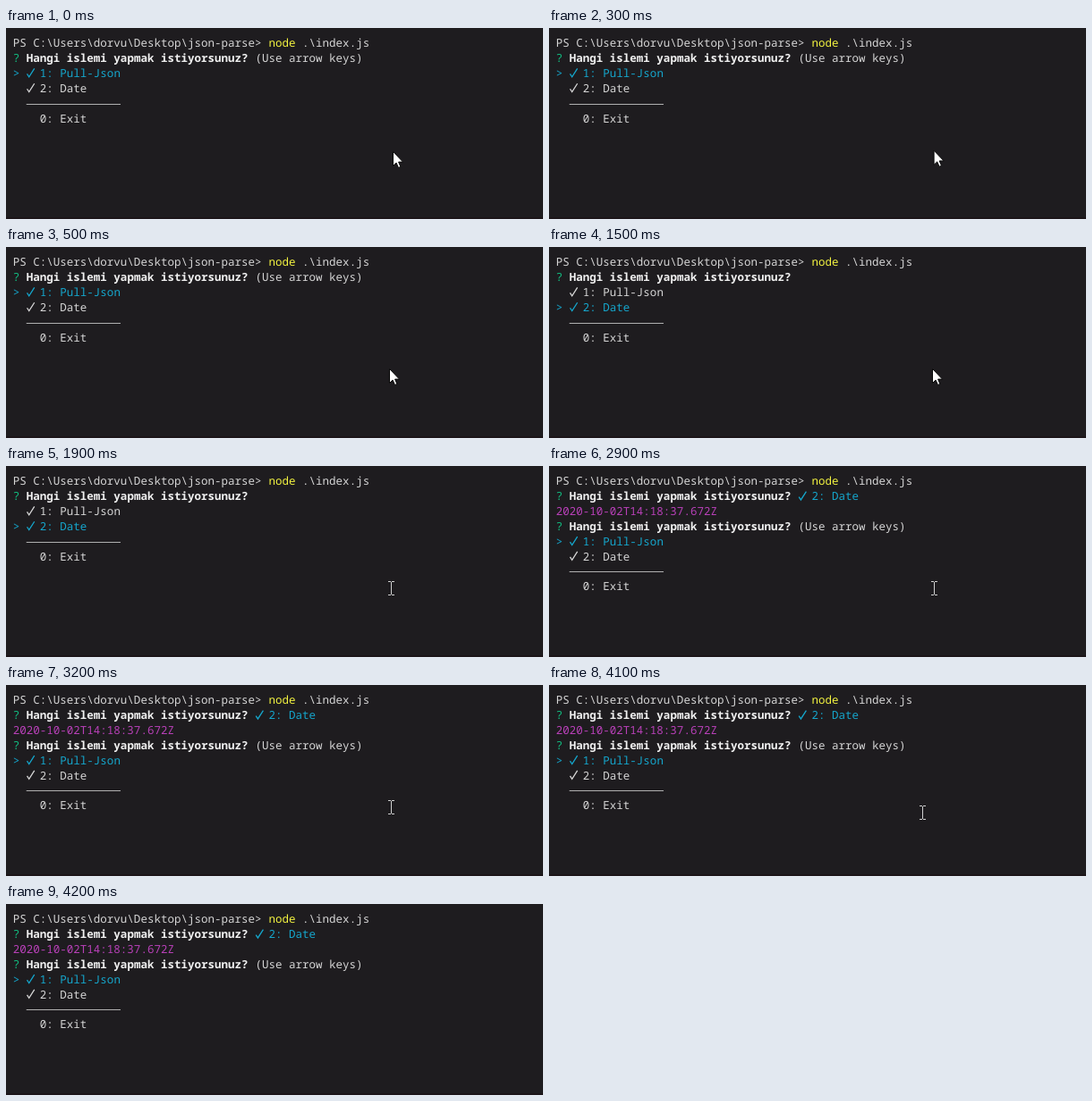
An HTML page with a canvas for the animation above (4.7 s loop, 600 px wide and 214 px high).

```html
<!DOCTYPE html>
<html lang="tr">
<head>
<meta charset="utf-8">
<title>Terminal menu</title>
<style>
  html, body { margin: 0; width: 100%; height: 100%; overflow: hidden; background: #1e1c1f; }
  canvas { display: block; }
</style>
</head>
<body>
<canvas id="stage" width="600" height="214"></canvas>
<script>
const ctx = document.getElementById('stage').getContext('2d');
const LOOP = 4700;
const LEFT = 7.7, CELL = 7.52, BASELINE = 21.3, ROW = 16.85;
const FONT = '12.53px "Noto Sans Mono", "DejaVu Sans Mono", monospace';
const COLOR = {
  back: '#1e1c1f', edge: '#1b1418', text: '#d6d6d6', bold: '#f0f0f0',
  yellow: '#f4f440', green: '#12bd80', cyan: '#15a6cc', magenta: '#b840b8'
};
const QUESTION = 'Hangi islemi yapmak istiyorsunuz?';
const ANSWER_COL = QUESTION.length + 3;

const colX = col => LEFT + col * CELL;
const rowY = row => BASELINE + row * ROW;

function text(str, col, row, color = COLOR.text, weight = 500) {
  ctx.font = `${weight} ${FONT}`;
  ctx.fillStyle = color;
  ctx.fillText(str, colX(col), rowY(row));
}

function polyline(points, color, width) {
  ctx.beginPath();
  points.forEach(([x, y]) => ctx.lineTo(x, y));
  ctx.strokeStyle = color;
  ctx.lineWidth = width;
  ctx.stroke();
}

function check(col, row, color) {
  const x = colX(col), y = rowY(row);
  polyline([[x + 0.8, y - 3.6], [x + 3, y - 0.2], [x + 9, y - 9.6]], color, 1.3);
}

function option(label, row, color) {
  check(2, row, color);
  text(label, 4, row, color);
}

function question(row) {
  text('?', 0, row, COLOR.green);
  text(QUESTION, 2, row, COLOR.bold, 700);
}

function menu(row, selected, hint) {
  question(row);
  if (hint) text('(Use arrow keys)', ANSWER_COL, row);
  ['1: Pull-Json', '2: Date'].forEach((label, i) => {
    const active = i === selected;
    if (active) text('>', 0, row + 1 + i, COLOR.cyan);
    option(label, row + 1 + i, active ? COLOR.cyan : COLOR.text);
  });
  ctx.fillStyle = '#b0b0b0';
  ctx.fillRect(colX(2), Math.round(rowY(row + 3) - 4), 14 * CELL, 1);
  text('0: Exit', 4, row + 4);
}

function arrow(x, y) {
  ctx.beginPath();
  [[0, 0], [0, 16], [3.6, 12.6], [6, 18], [8.4, 17], [6.1, 11.6], [11, 11.6]]
    .forEach(([dx, dy]) => ctx.lineTo(x + dx, y + dy));
  ctx.closePath();
  ctx.fillStyle = '#ffffff';
  ctx.fill();
  ctx.lineWidth = 1;
  ctx.strokeStyle = '#080808';
  ctx.stroke();
}

function beam(x, y) {
  ctx.fillStyle = '#d0d0d0';
  ctx.fillRect(x, y - 7, 1, 14);
  for (const edge of [y - 8, y + 7]) {
    ctx.fillRect(x - 3, edge, 3, 1);
    ctx.fillRect(x + 1, edge, 3, 1);
  }
}

function pointer(t) {
  if (t < 1700) {
    const step = Math.min(5, Math.floor(t / 100)) / 5;
    arrow(432.5 - 4 * step, 138.5 - 2 * step);
  } else if (t < 4100) {
    beam(430, 137);
  } else if (t < 4200) {
    beam(417, 143);
  }
}

function draw(t) {
  ctx.fillStyle = COLOR.back;
  ctx.fillRect(0, 0, 600, 214);
  ctx.fillStyle = COLOR.edge;
  ctx.fillRect(0, 212, 600, 2);

  const prompt = 'PS C:\\Users\\dorvu\\Desktop\\json-parse> ';
  text(prompt, 0, 0);
  text('node', prompt.length, 0, COLOR.yellow);
  text('.\\index.js', prompt.length + 5, 0);

  if (t < 2800) {
    const moved = t >= 1500;
    menu(1, moved ? 1 : 0, !moved);
  } else {
    question(1);
    check(ANSWER_COL, 1, COLOR.cyan);
    text('2: Date', ANSWER_COL + 2, 1, COLOR.cyan);
    text('2020-10-02T14:18:37.672Z', 0, 2, COLOR.magenta);
    menu(3, 0, true);
  }
  pointer(t);
}

ctx.textRendering = 'geometricPrecision';
const start = performance.now();
function tick() {
  draw((performance.now() - start) % LOOP);
  requestAnimationFrame(tick);
}
tick();
</script>
</body>
</html>
```
